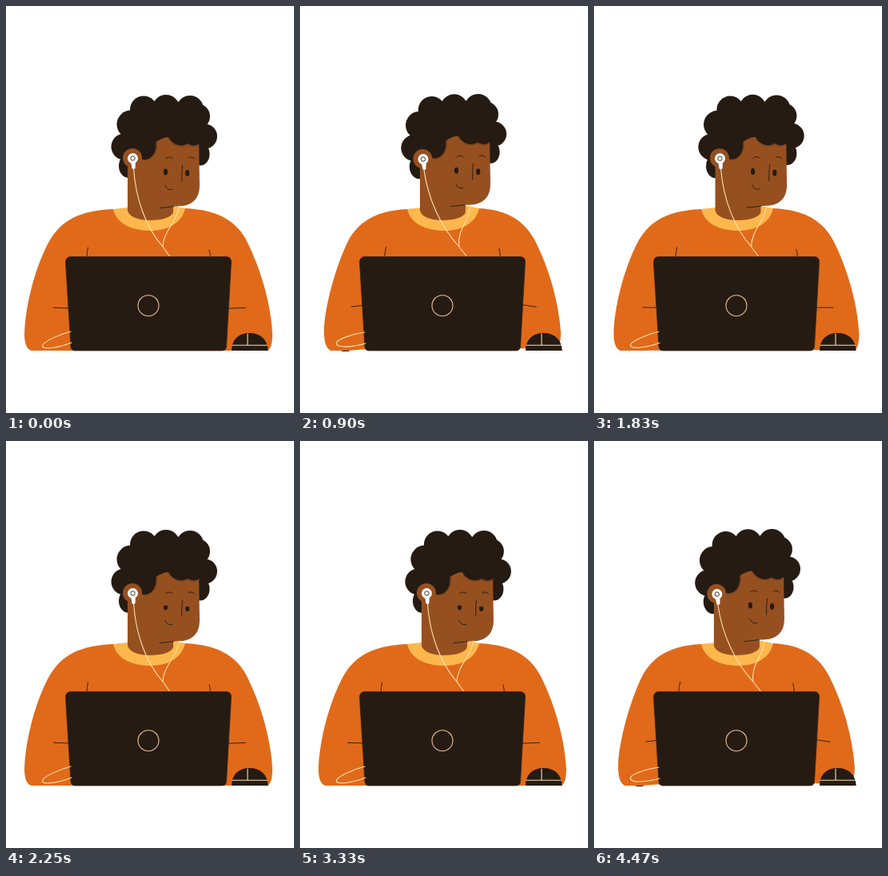
Recreate the animation shown at these times as an HTML page. Size 360x509 px, loop 4.5 s.

```html
<!DOCTYPE html>
<html lang="en">
<head>
<meta charset="utf-8">
<title>Working at a laptop</title>
<style>
  html, body { margin: 0; width: 100%; height: 100%; overflow: hidden; background: #fff; }
  svg { display: block; width: 100%; height: 100%; }
  .dark { fill: #251b13; }
  .skin { fill: #965020; }
  .ink, .wire { fill: none; stroke: #251b13; stroke-width: .9; stroke-linecap: round; }
  .wire { stroke: #fde0aa; stroke-width: 1.1; }
  .hairline { fill: none; stroke: #6f3c1a; stroke-width: .9; }
</style>
</head>
<body>
<svg viewBox="0 0 360 509">
  <ellipse id="shade" class="dark" cx="56" cy="430.8" rx="5.5" ry="1.3"/>
  <path id="body" fill="#e06a1a"/>
  <path id="creases" class="ink"/>
  <path fill="#feb74c" d="M134 254 C138 272 157 281 180 281 C203 281 220 271 224 253 L209 250 L152 252 Z"/>

  <g id="hair" class="dark">
    <circle cx="172" cy="129.500" r="17"/>
    <circle cx="200" cy="128" r="17"/>
    <circle cx="230" cy="129" r="17"/>
    <circle cx="239" cy="138" r="16"/>
    <circle cx="248.500" cy="163" r="15.500"/>
    <ellipse cx="243" cy="185" rx="11.500" ry="14.500"/>
    <circle cx="156" cy="148" r="17.500"/>
    <circle cx="148" cy="176" r="16.500"/>
    <ellipse cx="153" cy="200" rx="12" ry="15"/>
    <ellipse cx="200" cy="152" rx="49" ry="34"/>
  </g>

  <path id="neck" class="skin" d="M152 190 V256 C154 264 166 268 180 268 C196 268 207 264 209 258 V190 Z"/>

  <g id="face">
    <path class="skin" d="M160 160 H241 L242 224 C242 242 232 250 215 250.500 H200 L162 215 Z"/>
    <ellipse class="dark" cx="199.500" cy="207.500" rx="2.600" ry="4"/>
    <ellipse class="dark" cx="226.700" cy="209" rx="2.600" ry="4"/>
    <g id="lids" class="skin">
      <rect x="196" y="197" width="7" height="5.500"/>
      <rect x="223" y="198.500" width="7" height="5.500"/>
    </g>
    <path class="ink" d="M199.500 191 Q203.500 187 208 190.500 M228 190 Q232 187 236 191.500
      M220.500 199 Q219.500 209 219.700 219 M199 224.500 Q201 231 208 229.500
      M192 252.500 Q201 252 210 250.500"/>
  </g>

  <g id="fringe">
    <path class="dark" d="M152 150 H243 V171 C238 176 231 175 227 172 C220 177 208 174 203 164
      C198 164 192 167 187.500 170 C189 184 181 193 172 192 L152 190 Z"/>
    <path class="hairline" d="M172 192.500 C183 193 190 184 188.500 169"/>
    <path class="hairline" d="M203 165 C208 175 220 178 227 173 C231 176 238 177 242 172"/>
  </g>

  <path id="cord" class="wire"/>
  <g id="ear">
    <circle class="skin" cx="158" cy="190" r="12"/>
    <path fill="#fff" d="M156 194 H162 L161.500 203 Q159.500 205 157.500 203 Z"/>
    <circle cx="158.500" cy="190.500" r="6.500" fill="#fff"/>
    <circle cx="158.500" cy="190.500" r="2.700" fill="none" stroke="#251b13" stroke-width=".9"/>
  </g>

  <path class="dark" stroke="#3f2816" stroke-width=".8" d="M81 313.500 H275 Q282 313.500 281.500 321
    L275.500 426 Q275 431 270 431 H86 Q81.500 431 81 426 L74.500 321 Q74.500 313.500 81 313.500 Z"/>
  <circle cx="178" cy="374.700" r="13" fill="none" stroke="#eabf96" stroke-width="1.100"/>
  <path id="tail" class="wire"/>
  <path class="dark" d="M282 431 C282 417 291 409 304.500 409 C318 409 327 417 327.700 431 Z"/>
  <path class="wire" d="M283 424.300 H326.500 M302 410 V424"/>
</svg>
<script>
  const LOOP = 4500, BEAT = 1080;
  const $ = id => document.getElementById(id);

  // Each path has an upright and a leaning pose with matching commands.
  const poses = {
    body: [
      `M32 431 C26 430 23 422 23 410 C24 375 36 328 53 296 C65 274 84 256 134 254
       L224 253 C268 255 289 271 301 294 C317 326 331 370 333 410 C333 422 331 431 325 431
       L280 431 L180 431 L78 431 L60 431 Z`,
      `M39 431 C33 428 30.5 420 30.5 406 C31 380 43 330 61 293 C73 272 92 256 134 254
       L224 253 C262 255 281 271 293 293 C312 330 323 372 325.5 408 C325.5 420 323 431 318 431
       L280 428 L180 428 L78 429.3 L60 431 Z`
    ],
    creases: [
      "M59.5 377.3 L80 378 M102.5 302 Q101 308 101 315 M254 305 Q255.5 309 255.5 315 M276 378.3 L299.5 377.3",
      "M64.8 376 L80 374 M108 301.5 Q106.5 307 106 314 M248.5 303 Q250 308 250 315 M276 373 L295 376.3"
    ],
    cord: [
      "M159.5 203 C162 240 174 276 196 301 L206 315 M217 250 C213 272 197 280 196 301",
      "M154.5 204 C160 243 177 277 199 301 L210 315 M213 250 C210 272 196 280 199 301"
    ],
    tail: [
      "M81 407 C66 411 46 420 45.5 425 C45 430 64 428 82 421",
      "M81 408 C65 410 46 417 45.5 421 C45 428 64 427 82 422"
    ]
  };

  const mix = (a, b, p) => a + (b - a) * p;
  const clamp = x => Math.min(1, Math.max(0, x));
  const NUM = /[\d.]+/g;
  function morph([a, b], p) {
    const to = b.match(NUM);
    let i = 0;
    return a.replace(NUM, n => mix(+n, +to[i++], p).toFixed(2));
  }

  // Lean over, come back, rest for one beat.
  function lean(t) {
    const u = t % (3 * BEAT) / BEAT;
    return u < 2 ? (1 - Math.cos(Math.PI * u)) / 2 : 0;
  }
  const lidDrop = t => clamp((t - 2100) / 120) * clamp((3480 - t) / 120);

  const place = (id, transform) => $(id).setAttribute("transform", transform);
  const shift = (id, x, y) => place(id, `translate(${x} ${y})`);

  function draw() {
    const t = performance.now() % LOOP, p = lean(t);
    for (const id in poses) $(id).setAttribute("d", morph(poses[id], p));
    for (const id of ["hair", "ear"]) place(id, `rotate(${-2.7 * p} 180 295)`);
    shift("neck", -2.2 * p, 0);
    shift("face", -4.3 * p, -2 * p);
    shift("fringe", -5.5 * p, -1.5 * p);
    shift("lids", 0, 3.2 * lidDrop(t));
    shift("shade", mix(-2, 1, p), -3 * clamp(1 - 2 * p));
    requestAnimationFrame(draw);
  }
  draw();
</script>
</body>
</html>
```
